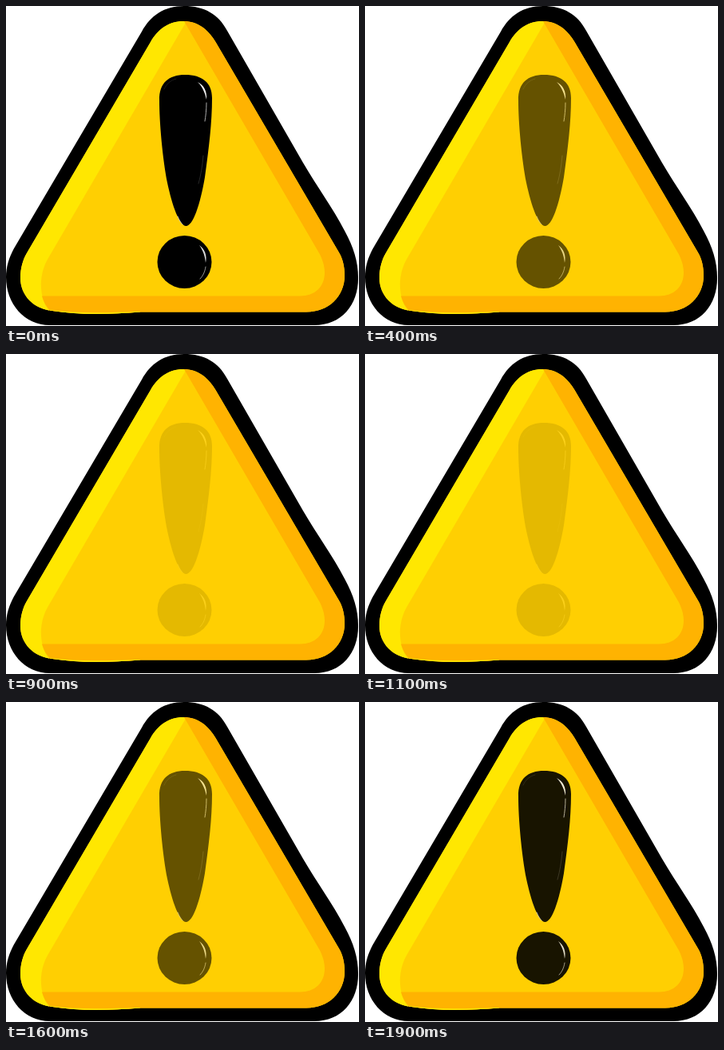
Recreate the animation shown at these times as an HTML page with a canvas. Size 442 by 400 pixels, loop 2000 ms.

```html
<!DOCTYPE html>
<html lang="en">
<head>
<meta charset="utf-8">
<title>Warning sign</title>
<style>
html, body { margin: 0; width: 100%; height: 100%; overflow: hidden; background: #fff; }
canvas { display: block; }
</style>
</head>
<body>
<canvas id="stage" width="442" height="400"></canvas>
<script>
const W = 442, H = 400, LOOP = 2000, STEP = 100;
const ctx = document.getElementById('stage').getContext('2d');

function makeLayer(draw) {
  const layer = document.createElement('canvas');
  layer.width = W;
  layer.height = H;
  draw(layer.getContext('2d'));
  return layer;
}

function fill(c, color, path) {
  c.fillStyle = color;
  c.fill(new Path2D(path));
}

function line(c, color, width, path) {
  c.strokeStyle = color;
  c.lineWidth = width;
  c.stroke(new Path2D(path));
}

const sign = makeLayer(c => {
  fill(c, '#000', `M170 32 C181 12 198 0 223 0 C248 0 266 10 277 31
    L372 196 C390 227 409 252 424 281 C435 301 441 319 441 340
    C441 374 420 399 386 399 L55 399 C23 399 0 372 0 339
    C0 326 4 314 10 303 Z`);

  const face = `M181 45 C190 29 204 19 222 19 C240 19 253 29 262.5 45
    L417.5 309 C422 317 424 326 424 337 C424 363 404 382.5 376 382.5
    L168 382.5 C132 385 95 387 58 381 C35 379 18 362 18 340
    C18 328 21 317 26.5 308 Z`;
  fill(c, '#ffcf02', face);

  c.save();
  c.clip(new Path2D(face));
  // Light left side
  fill(c, '#ffe701', `M226 19 L53 315 C44 330 41 350 47 368 C49 375 53 380 57 383
    L0 400 L0 300 L170 0 L226 0 Z`);
  // Shaded right side and base
  fill(c, '#ffb301', `M223 19 L391 307 C396 315 399 325 399 333
    C399 351 387 362.5 368 362.5 L45 362.5 C47 370 51 377 57 382
    L165 390 L442 400 L442 300 L270 0 L223 0 Z`);
  fill(c, '#ffe701', 'M55 380 C92 385 130 383 168 382 L168 388 L55 388 Z');
  c.restore();
});

const mark = makeLayer(c => {
  c.lineCap = 'round';
  fill(c, '#000', `M192 118 C191.5 96 204 86 224 86 C246 86 258 96 258 115
    C258 146 254 178 249 214 C243 249 234 275 225.5 275
    C217 275 208 249 202 221 C196 190 192 146 192 118 Z`);
  c.fillStyle = '#000';
  c.beginPath();
  c.ellipse(223.5, 320, 34, 33, 0, 0, Math.PI * 2);
  c.fill();

  // Faint rims
  line(c, '#222', 0.8, 'M198 104 C201 97 206 93 213 91');
  line(c, '#333', 0.8, 'M247 187 C246 200 244 211 241 222');

  // Gloss
  fill(c, '#eee', 'M240 95 C248 99 252 107 251 117 C249 108 246 101 240 95 Z');
  line(c, '#aaa', 1, 'M251 121 C251 130 250 138 249 144');
  fill(c, '#ddd', 'M242 299 C249 304 252 312 250 321 C249 312 247 306 242 299 Z');
  line(c, '#bbb', 0.8, 'M250 326 C249 333 246 338 243 341');
  line(c, '#ddd', 0.8, 'M215 263 C217 268 219 271 221 273');
});

function render(now) {
  const step = Math.floor((now % LOOP) / STEP);
  ctx.clearRect(0, 0, W, H);
  ctx.globalAlpha = 1;
  ctx.drawImage(sign, 0, 0);
  ctx.globalAlpha = Math.abs(1 - step / 10);
  ctx.drawImage(mark, 0, 0);
}

let start;
function tick(now) {
  start ??= now;
  render(now - start);
  requestAnimationFrame(tick);
}
render(0);
requestAnimationFrame(tick);
</script>
</body>
</html>
```
